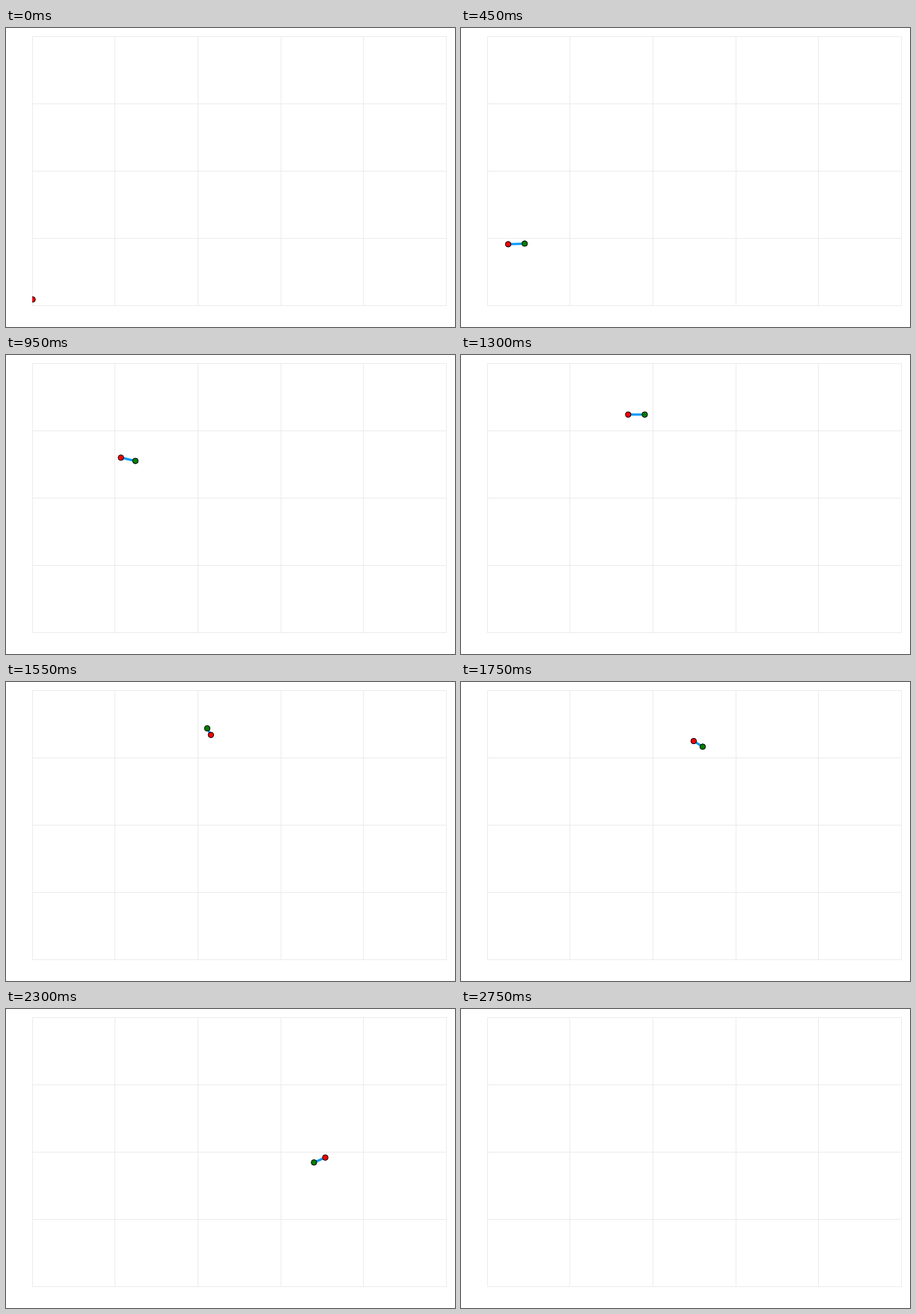
Write an HTML page with a canvas that moves like this. It is 600x400 px and loops after 4750 ms.

```html
<!DOCTYPE html>
<html lang="en">
<head>
<meta charset="utf-8">
<title>Thrown baton</title>
<style>
html, body { margin: 0; height: 100%; overflow: hidden; background: #fff; }
canvas { display: block; }
</style>
</head>
<body>
<canvas id="stage" width="600" height="400"></canvas>
<script>
const ctx = document.getElementById("stage").getContext("2d");
const LOOP = 4750, STEP = 50, LAST = 55;
const LEFT = 35.4, BOTTOM = 371.5, UNIT_X = 22.12, UNIT_Y = 9;

// step, x of the centre of mass, angle of the baton in degrees
const keys = [
  [0, -0.08, 150], [9, 1.35, 5.6], [11, 1.98, -35], [19, 5.43, -389],
  [22, 6.78, -540], [26, 8.6, -720], [33, 11.62, -1080], [35, 12.51, -1137],
  [44, 16.64, -1620], [46, 17.62, -1573], [54, 21.35, -1950], [55, 21.82, -1998]
];

function pose(n) {
  const i = Math.max(1, keys.findIndex(k => k[0] >= n));
  const a = keys[i - 1], b = keys[i];
  let u = (n - a[0]) / (b[0] - a[0]);
  if (i === 1) u = u ** 1.9; // time steps start small
  const x = a[1] + (b[1] - a[1]) * u;
  const angle = (a[2] + (b[2] - a[2]) * u) * Math.PI / 180;
  const y = 33.52 - 0.288 * (x - 10.55) ** 2;
  const end = r => [
    LEFT + UNIT_X * (x + r * Math.cos(angle)),
    BOTTOM - UNIT_Y * (y + r * Math.sin(angle))
  ];
  return { heavy: end(-0.1), light: end(0.9) };
}

function grid() {
  ctx.fillStyle = "#ececec";
  for (const x of [35, 145, 256, 367, 477, 588]) ctx.fillRect(x, 11, 1, 361);
  for (const y of [11, 101, 191, 281, 371]) ctx.fillRect(35, y, 554, 1);
}

function dot([x, y], color) {
  ctx.beginPath();
  ctx.arc(x, y, 3.7, 0, 2 * Math.PI);
  ctx.fillStyle = color;
  ctx.fill();
  ctx.strokeStyle = "#000";
  ctx.lineWidth = 1;
  ctx.stroke();
}

function draw(n) {
  ctx.clearRect(0, 0, 600, 400);
  grid();
  const { heavy, light } = pose(n);
  ctx.save();
  ctx.beginPath();
  ctx.rect(35, 11, 554, 361);
  ctx.clip();
  ctx.beginPath();
  ctx.moveTo(...heavy);
  ctx.lineTo(...light);
  ctx.strokeStyle = "#009afa";
  ctx.lineWidth = 3;
  ctx.stroke();
  dot(heavy, "#f00");
  dot(light, "#008000");
  ctx.restore();
}

const start = performance.now();
function tick() {
  const t = (performance.now() - start) % LOOP;
  draw(Math.min(LAST, Math.floor(t / STEP)));
  requestAnimationFrame(tick);
}
tick();
</script>
</body>
</html>
```
